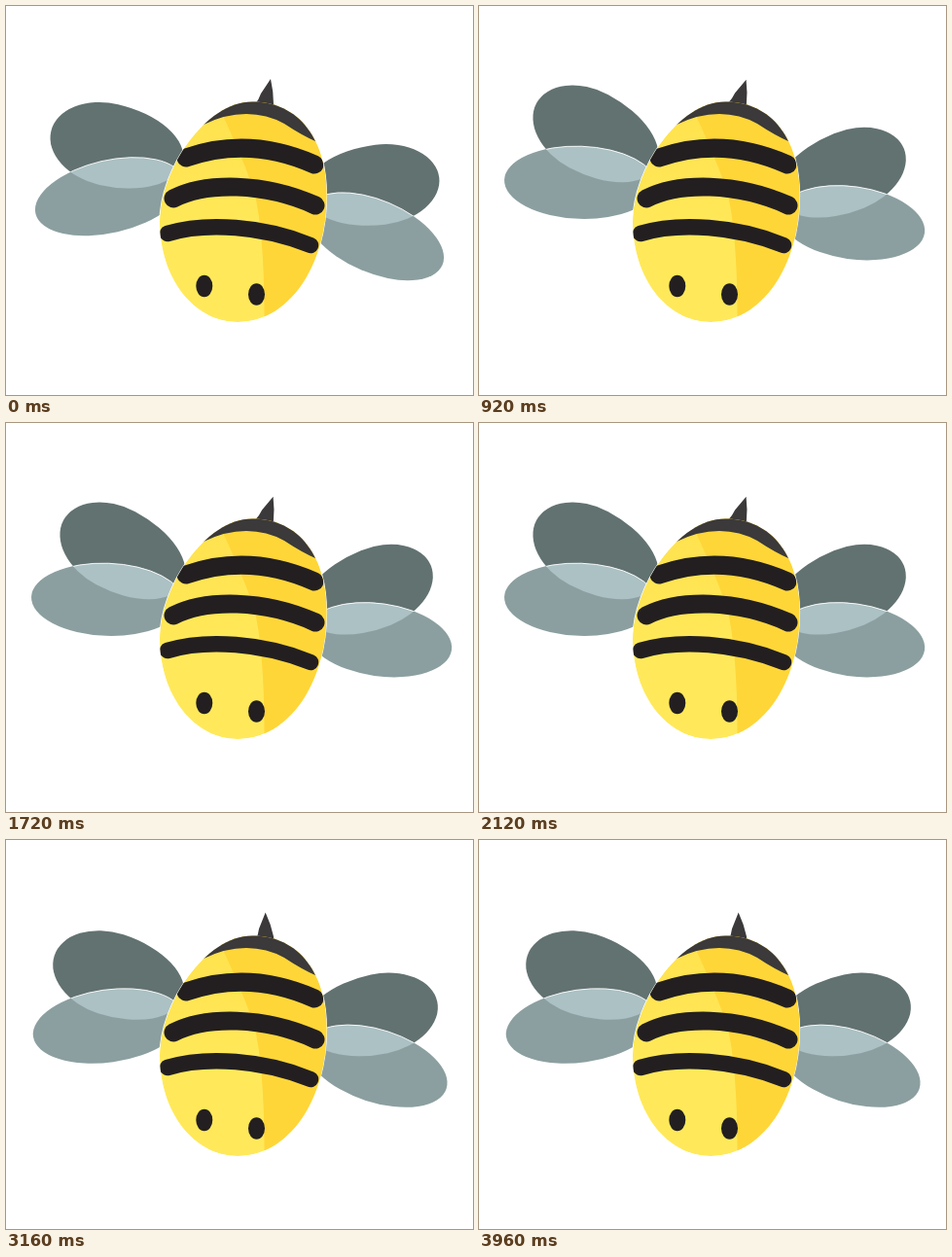
Animation, 480 px wide and 400 px high, one loop 4000 ms. Source, as an HTML page with a canvas:

```html
<!DOCTYPE html>
<html lang="en">
<head>
<meta charset="utf-8">
<title>Bee</title>
<style>
  html, body { margin: 0; width: 100%; height: 100%; overflow: hidden; background: #fff; }
  canvas { display: block; }
</style>
</head>
<body>
<canvas id="stage" width="480" height="400"></canvas>
<script>
const ctx = document.getElementById('stage').getContext('2d');
const RAD = Math.PI / 180;
const STEP = 40, HALF_BEAT = 200, SWING = 25, WIGGLE = 15;
const INK = '#231f20', CAP = '#3b393a';

// Each wing: resting egg (widest at x, y; radii left, right, ry; tilt) and its hinge.
const wingPairs = [
  { turn: 1,
    back:  { x: 105.7, y: 142.6, left: 61, right: 78, ry: 42.5, tilt: 13, hingeX: 162, hingeY: 163 },
    front: { x: 106.4, y: 196, left: 78, right: 78, ry: 37.3, tilt: -13, hingeX: 160.2, hingeY: 179.6 } },
  { turn: -1,
    back:  { x: 384.7, y: 183.7, left: 78, right: 61, ry: 41.3, tilt: -7, hingeX: 328.3, hingeY: 193.8 },
    front: { x: 379.5, y: 237, left: 75, right: 75, ry: 37.3, tilt: 23, hingeX: 328.4, hingeY: 214 } },
];

function egg(x, y, left, right, ry, tilt = 0) {
  const path = new Path2D();
  path.ellipse(x, y, right, ry, tilt * RAD, -Math.PI / 2, Math.PI / 2);
  path.ellipse(x, y, left, ry, tilt * RAD, Math.PI / 2, Math.PI * 3 / 2);
  path.closePath();
  return path;
}

function wingPath(w, angle) {
  const c = Math.cos(angle * RAD), s = Math.sin(angle * RAD);
  const dx = w.x - w.hingeX, dy = w.y - w.hingeY;
  return egg(w.hingeX + dx * c - dy * s, w.hingeY + dx * s + dy * c,
    w.left, w.right, w.ry, w.tilt + angle);
}

function fill(path, color) {
  ctx.fillStyle = color;
  ctx.fill(path);
}

function stroke(path, color, width) {
  ctx.strokeStyle = color;
  ctx.lineWidth = width;
  ctx.stroke(path);
}

const body = new Path2D(`M253 98.5 C302 98.5 329.5 138 329.5 195 C329.5 268 290 325 238 325
  C193 325 158 280 158 222 C158 168 205 98.5 253 98.5 Z`);
const shade = new Path2D('M217 100 Q240 148 255 190 Q266 235 265.5 330 H340 V90 Z');
const cap = new Path2D('M196 125 L203 122 Q225 111 247 111 Q268 111 286 121 Q304 133 320 140 L340 143 V80 H196 Z');
const sting = new Path2D('M272 75 L262 90 Q260 96 256 101 L258 106 H274 L275 101 Q275 88 272 75 Z');
const stripes = [
  ['M185 156 C225 142 270 142 317 163', 19],
  ['M172 198 C205 181 265 181 318 205', 19],
  ['M166 234 C205 222 265 226 313 246', 16.5],
].map(([d, width]) => [new Path2D(d), width]);
const eyes = [egg(203.8, 288, 8.5, 8.5, 11.2), egg(257.5, 296.5, 8.5, 8.5, 11.2)];

const glow = ctx.createLinearGradient(0, 110, 0, 300);
glow.addColorStop(0, '#ffe24e');
glow.addColorStop(0.7, '#ffe95a');

function drawWings({ turn, back, front }, angle) {
  const backPath = wingPath(back, turn * angle);
  const frontPath = wingPath(front, turn * angle);
  fill(backPath, '#627271');
  fill(frontPath, '#8c9fa0');
  ctx.save();
  ctx.clip(backPath);
  fill(frontPath, '#acc1c4');
  stroke(frontPath, '#fff', 0.9);
  ctx.restore();
}

function drawSting(angle) {
  ctx.save();
  ctx.translate(267, 100);
  ctx.rotate(angle * RAD);
  ctx.translate(-267, -100);
  fill(sting, CAP);
  ctx.restore();
}

function drawBody() {
  ctx.save();
  ctx.clip(body);
  fill(body, glow);
  fill(shade, '#ffd638');
  fill(cap, CAP);
  ctx.lineCap = 'round';
  for (const [path, width] of stripes) stroke(path, INK, width);
  for (const eye of eyes) fill(eye, INK);
  ctx.restore();
}

function draw(time) {
  const phase = (Math.floor(time / STEP) * STEP % (2 * HALF_BEAT)) / HALF_BEAT;
  const beat = phase > 1 ? 2 - phase : phase;
  // Triangle wave: left, right and back within each half beat.
  const wiggle = -WIGGLE * Math.asin(Math.sin(2 * Math.PI * beat)) * 2 / Math.PI;

  ctx.fillStyle = '#fff';
  ctx.fillRect(0, 0, 480, 400);
  for (const pair of wingPairs) drawWings(pair, SWING * beat);
  stroke(body, '#fff', 1.2);
  drawSting(wiggle);
  drawBody();
}

const start = performance.now();
function tick() {
  draw(performance.now() - start);
  requestAnimationFrame(tick);
}
tick();
</script>
</body>
</html>
```
